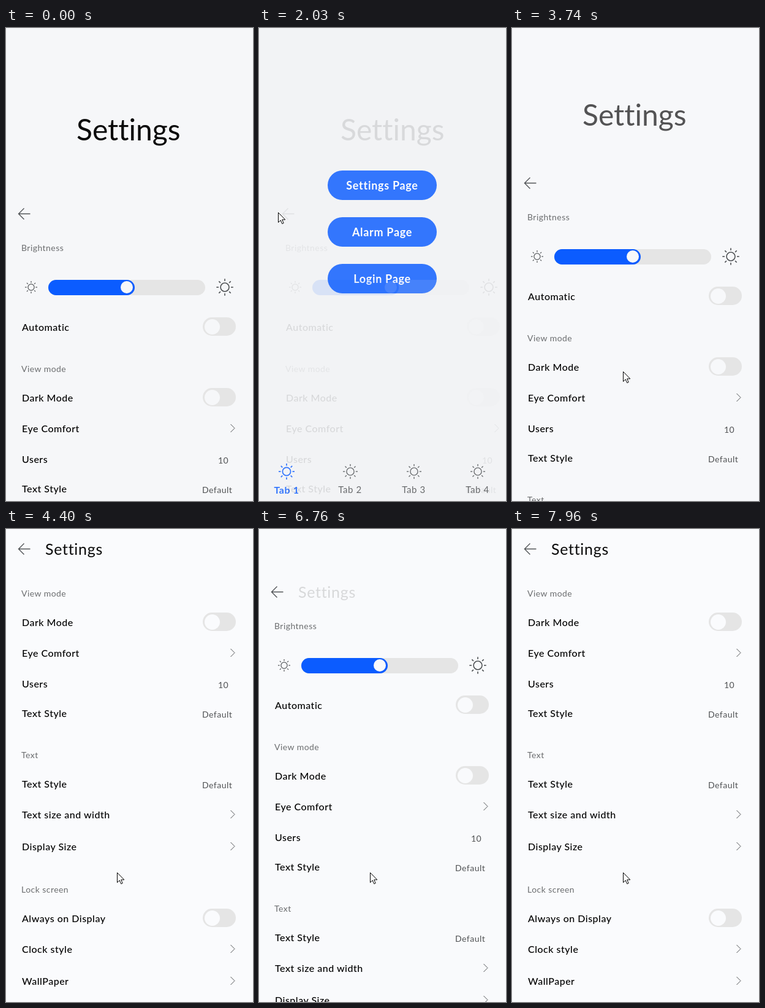
Animation of 403 by 770 pixels, one loop 8000 ms. Source, as an HTML page:

```html
<!DOCTYPE html>
<html lang="en">
<head>
<meta charset="utf-8">
<title>Settings</title>
<style>
  html, body { margin: 0; width: 100%; height: 100%; overflow: hidden; }
  body { font: 400 16px Lato, "Open Sans", sans-serif; color: #000; font-variant-ligatures: none; }
  #stage { position: relative; width: 403px; height: 770px; overflow: hidden; background: var(--bg); }
  #stage div, #stage svg { position: absolute; }
  #page, #home { inset: 0; }
  #view { left: 0; right: 0; bottom: 0; overflow: hidden; }
  #list { left: 0; top: 0; width: 403px; }
  #bar { left: 0; top: 0; }
  svg { overflow: visible; fill: none; stroke: #505356; }

  .text { line-height: 40px; margin-top: -20px; white-space: pre; letter-spacing: .5px; }
  .row { font-weight: 500; }
  .head { font-size: 14px; color: #6b6d6f; letter-spacing: .45px; }
  .value { font-size: 14px; color: #505254; }
  .plan { font-size: 13px; color: #505254; }
  .price { font-weight: 700; font-size: 17px; letter-spacing: .6px; }
  .big { font-size: 48px; letter-spacing: 0; line-height: 60px; margin-top: -30px; color: #0a0a0a; }
  .small { font-size: 25px; letter-spacing: .7px; color: #0a0a0a; }

  .track { left: 69px; top: 410px; width: 256px; height: 25px; border-radius: 13px; background: #e5e5e5; }
  .fill { width: 141px; height: 25px; border-radius: 13px; background: #0b5cff; }
  .thumb { left: 118px; top: 2px; width: 20px; height: 20px; border-radius: 50%; background: var(--bg); }
  .toggle { left: 321px; width: 54px; height: 30px; margin-top: -15px; border-radius: 15px; background: #e5e5e5; }
  .knob { left: 3px; top: 3px; width: 25px; height: 25px; border-radius: 50%; background: var(--bg); }
  .card { left: 6px; top: 1419px; width: 388px; height: 84px; border: 1px solid #e1e2e4; border-radius: 13px; }
  .radio { left: 354px; top: 1434px; width: 22px; height: 22px; border: 2px solid #e1e2e4; border-radius: 50%; }

  .button { left: 112px; width: 178px; height: 48px; border-radius: 24px; background: #0b5cff; color: #fff;
    font: 700 18px/49px Lato, "Open Sans", sans-serif; text-align: center; letter-spacing: .7px; }
  .tab { width: 80px; margin-left: -40px; text-align: center; font-size: 15px; color: #4c4e50; letter-spacing: .6px; }
  .tab.on { font-weight: 700; font-size: 16px; color: #0b5cff; }
  #cursor { left: 0; top: 0; fill: #fff; stroke: #000; stroke-width: 1; }
</style>
</head>
<body>
<div id="stage">
  <div id="home"></div>
  <div id="page">
    <div id="view"><div id="list"></div></div>
    <div class="text big" id="big" style="left:115px;top:165px">Settings</div>
    <div id="bar">
      <svg width="1" height="1" stroke-width="1.4"><path d="M39.5 .5H20.5M29.5-8.5L20.5 .5L29.5 9.5"/></svg>
      <div class="text small" id="small" style="left:64px;top:0">Settings</div>
    </div>
  </div>
  <svg id="cursor" width="12" height="19"><path d="M.5 .5V16.5L4.2 13L6.8 18.7L9.2 17.6L6.7 12H11.8Z"/></svg>
</div>
<script>
  const $ = id => document.getElementById(id);
  const clamp = (v, a = 0, b = 1) => Math.min(b, Math.max(a, v));

  const text = (cls, x, y, str) => `<div class="text ${cls}" style="left:${x}px;top:${y}px">${str}</div>`;
  const toggle = y => `<div class="toggle" style="top:${y}px"><div class="knob"></div></div>`;
  const chevron = y => `<svg style="left:366px;top:${y - 6}px" width="8" height="13"><path d="M.5 0L7 6.5L.5 13"/></svg>`;
  const sun = (x, y, r, width, color = '#505356') => {
    const rays = Array.from({ length: 8 }, (_, i) => `<path d="M0-9.8V-13.4" transform="rotate(${i * 45})"/>`).join('');
    return `<svg style="left:${x}px;top:${y}px;stroke:${color}" width="1" height="1">` +
      `<g transform="scale(${r / 13.4})" stroke-width="${width * 13.4 / r}"><circle r="6.8"/>${rays}</g></svg>`;
  };

  const heads = [['Brightness', 358], ['View mode', 555], ['Text', 818], ['Lock screen', 1037], ['Billing', 1400]];
  const rows = [
    ['Automatic', 487, toggle], ['Dark Mode', 602, toggle], ['Eye Comfort', 652, chevron],
    ['Users', 702, '10'], ['Text Style', 750, 'Default'], ['Text Style', 865, 'Default'],
    ['Text size and width', 915, chevron], ['Display Size', 967, chevron],
    ['Always on Display', 1084, toggle], ['Clock style', 1134, chevron], ['WallPaper', 1186, chevron],
    ['Show Informations', 1236, toggle], ['Date', 1284, 'date'], ['Users', 1332, '10']
  ];
  const control = (kind, y) => {
    if (typeof kind === 'function') return kind(y - 1);
    if (kind === 'date')
      return text('value', 251, y + 1, 'day') + text('value', 283, y + 1, 'month') + text('value', 336, y + 1, 'year');
    return text('value', kind === '10' ? 346 : 320, y + 2, kind);
  };

  $('list').innerHTML =
    heads.map(([s, y]) => text('head', 25, y, s)).join('') +
    rows.map(([s, y, kind]) => text('row', 26, y, s) + control(kind, y)).join('') +
    '<div class="track"><div class="fill"></div><div class="thumb"></div></div>' +
    sun(41, 422, 10, 1.2) + sun(356.5, 421.5, 13.7, 1.6) +
    '<div class="card"></div><div class="radio"></div>' +
    text('plan', 26, 1443, 'MONTHLY') + text('price', 26, 1469, '$17.99 / month');

  $('home').innerHTML =
    ['Settings', 'Alarm', 'Login'].map((s, i) =>
      `<div class="button" style="top:${232 + 76 * i}px">${s} Page</div>`).join('') +
    [45, 148.5, 252.5, 356.5].map((x, i) =>
      sun(x, 721.5, i ? 12 : 13, i ? 1.4 : 1.7, i ? '#505356' : '#0b5cff') +
      text(i ? 'tab' : 'tab on', x, i ? 751 : 752, 'Tab ' + (i + 1))).join('');

  // Wheel bursts: start, end, ticks, from, to
  const bursts = [
    [3740, 3741, 1, 0, 50], [3880, 4210, 6, 50, 350], [4350, 4400, 2, 350, 450],
    [4870, 5310, 6, 450, 750], [5780, 5781, 1, 750, 700], [5920, 6430, 9, 700, 250],
    [6760, 6960, 5, 250, 0], [7590, 7960, 8, 0, 450]
  ];
  function scrollAt(t) {
    const b = bursts.filter(s => t >= s[0]).pop();
    if (!b) return 0;
    const [start, end, n, from, to] = b;
    const k = Math.min(n, Math.floor((t - start + 1) / (end - start) * (n - 1)) + 1);
    return Math.ceil((from + (to - from) * k / n) / 50) * 50;
  }

  // Pointer path: time, x, y
  const path = [
    [0, 150, 790], [330, 150, 780], [480, 137, 640], [620, 180, 559], [780, 275, 600], [930, 256, 638],
    [1075, 256, 638], [1090, 148, 400], [1120, 39, 157], [1149, 39, 157], [1150, -30, 157], [1340, -30, 315],
    [1360, 0, 315], [1570, 31, 300], [2080, 31, 300], [2430, 170, 262], [2870, 170, 262],
    [3340, 181, 557], [3430, 181, 559], [8001, 181, 559]
  ];
  function pointerAt(t) {
    const i = path.findIndex(p => p[0] > t);
    const [t0, x0, y0] = path[i - 1], [t1, x1, y1] = path[i];
    const u = (t - t0) / (t1 - t0);
    return [x0 + (x1 - x0) * u, y0 + (y1 - y0) * u];
  }

  const mix = (a, b, u) => a.map((v, i) => Math.round(v + (b[i] - v) * u));

  function draw(now) {
    const t = now % 8000;
    const scroll = scrollAt(t);
    const fold = clamp(scroll / 270);
    const barY = 302 - 270 * fold;
    const away = clamp((t - 1740) / 325) - clamp((t - 2540) / 325);
    const home = clamp((t - 1740) / 354) - clamp((t - 2540) / 325);

    const bg = mix(mix([246, 247, 249], [250, 251, 253], fold), [241, 242, 244], home);
    $('stage').style.setProperty('--bg', `rgb(${bg})`);
    $('home').style.opacity = home;
    $('page').style.opacity = 1 - away;
    $('page').style.transform = `translateX(${Math.round(20 * away)}px)`;

    $('view').style.top = barY + 32 + 'px';
    $('list').style.transform = `translateY(${-scroll - barY - 32}px)`;
    $('bar').style.transform = `translateY(${barY}px)`;
    $('big').style.transform = `translateY(${-.48 * scroll}px)`;
    $('big').style.opacity = clamp(1 - fold / .6);
    $('small').style.opacity = clamp((fold - .7) / .3);

    const [x, y] = pointerAt(t);
    $('cursor').style.transform = `translate(${Math.round(x)}px,${Math.round(y)}px)`;
    requestAnimationFrame(() => draw(performance.now()));
  }
  draw(performance.now());
</script>
</body>
</html>
```
